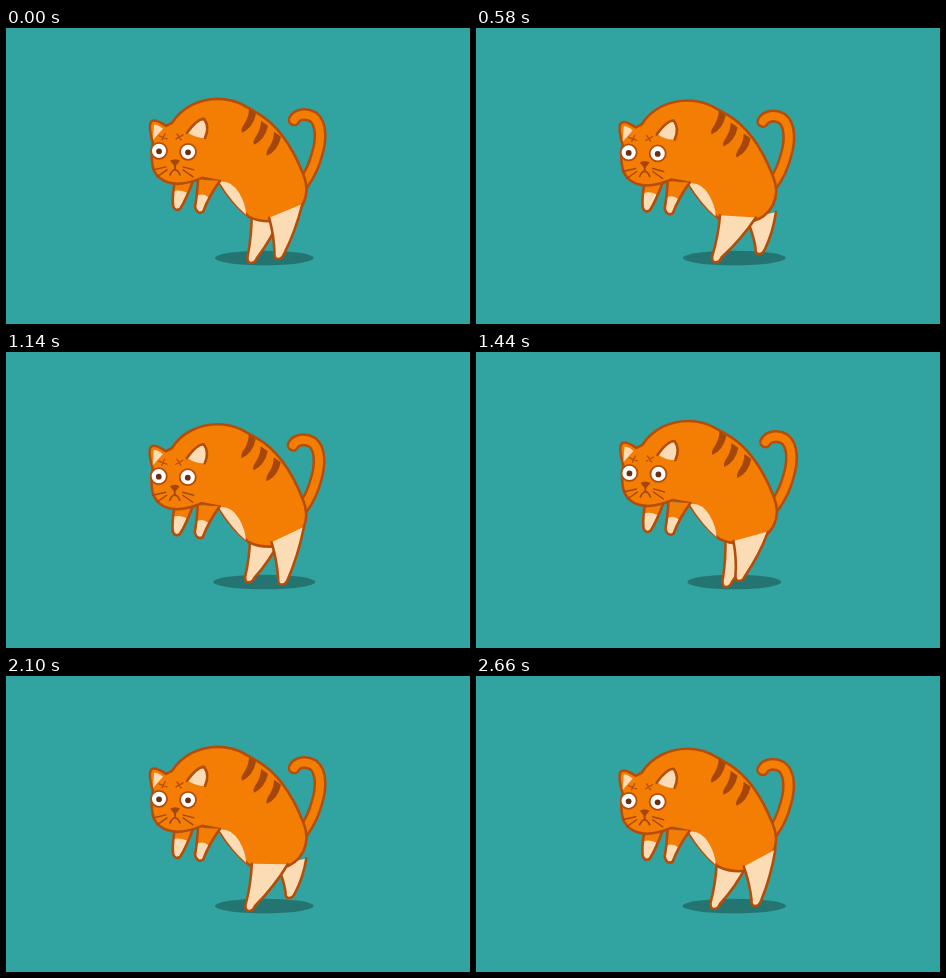
Write an HTML page with a canvas that moves like this. It is 464x296 px and loops after 2760 ms.

```html
<!DOCTYPE html>
<html lang="en">
<head>
<meta charset="utf-8">
<title>Walking cat</title>
<style>
  html, body { margin: 0; width: 100%; height: 100%; overflow: hidden; background: #31a3a1; }
  canvas { display: block; }
</style>
</head>
<body>
<canvas id="stage" width="464" height="296"></canvas>
<script>
const ctx = document.getElementById('stage').getContext('2d');
const ORANGE = '#f47d04', LINE = '#b54d0a', CREAM = '#fcdcb5', DARK = '#a5470d';
const LOOP = 2760, STEPS = 58, STRIDE = 30;

// Uneven cadence: every third pose is held.
const hold = i => (i < 30 ? i % 3 === 1 : i % 3 === 2 || i === 57) ? 100 : 20;

// Foot positions over one stride: [step, x, y]
const NEAR = [[0, 273, 230], [2, 264, 228], [7, 248, 229], [9, 241, 232], [12, 239, 233],
              [15, 244, 234], [19, 253, 236], [21, 265, 235], [24, 275, 233], [27, 280, 229], [30, 273, 230]];
const FAR = [[0, 284, 221], [4, 278, 215], [6, 259, 221], [9, 246, 228], [12, 239, 232],
             [15, 246, 234], [17, 251, 234], [22, 274, 231], [24, 278, 231], [27, 284, 227], [30, 284, 221]];

function footAt(keys, step) {
  const k = step % STRIDE;
  const i = keys.findIndex(key => key[0] > k);
  const [a, ax, ay] = keys[i - 1], [b, bx, by] = keys[i];
  const f = (k - a) / (b - a);
  return [ax + (bx - ax) * f, ay + (by - ay) * f];
}

function paint(d, fill, stroke, width = 2.6) {
  const path = new Path2D(d);
  if (fill) { ctx.fillStyle = fill; ctx.fill(path); }
  if (stroke) { ctx.strokeStyle = stroke; ctx.lineWidth = width; ctx.stroke(path); }
}

function oval(x, y, rx, ry, fill, stroke, width) {
  paint(`M${x - rx} ${y}a${rx} ${ry} 0 1 1 ${2 * rx} 0a${rx} ${ry} 0 1 1 ${-2 * rx} 0Z`, fill, stroke, width);
}

// A tapering hind leg from a tilted hip line down to a rounded toe.
function hindLeg([x, y], cx, cy, half, tilt) {
  const dx = half * Math.cos(tilt), dy = half * Math.sin(tilt);
  const lx = cx - dx, ly = cy - dy, rx = cx + dx, ry = cy + dy;
  paint(`M${lx} ${ly}Q${(lx + x) / 2} ${(ly + y) / 2 - 2} ${x - 4.5} ${y - 5}` +
        `Q${x - 5} ${y + 1} ${x - 1} ${y + 1}Q${x + 3} ${y + 1} ${x + 5} ${y - 4}` +
        `Q${(rx + x) / 2 + 5} ${(ry + y) / 2} ${rx} ${ry}`, CREAM, LINE);
}

function drawTail() {
  const d = 'M288 92C291 86 300 85 307 89C316 96 315 113 311 126Q307 142 297 156';
  paint(d, null, LINE, 13);
  paint(d, null, ORANGE, 8);
}

function drawBody() {
  // far front paw
  paint('M169 153Q166 167 167 178Q169 184 174 181Q180 172 187 153', ORANGE);
  paint('M167 164Q173 161 181 165L174 181Q169 184 167 178Z', CREAM);
  paint('M169 153Q166 167 167 178Q169 184 174 181Q180 172 187 153', null, LINE);

  // head, back and belly
  paint('M147 116Q142 98 145 94Q148 90 160 98L166 95C176 79 194 71 212 71C229 71 239 78 251 85' +
        'C274 98 288 123 297 146Q304 162 297 176Q290 189 276 192Q258 196 243 189Q226 176 212 153' +
        'L196 150Q185 155 172 156C157 156 147 148 146 134Q145 124 147 116Z', ORANGE, LINE);
  paint('M213 154Q225 152 233 165Q240 177 240 187Q226 175 213 154Z', CREAM);

  // near front paw
  const paw = 'M192 152Q191 168 189 179Q191 187 197 184Q203 168 214 153';
  paint(paw, ORANGE);
  paint('M190 169Q196 164 203 170L197 184Q191 187 189 179Z', CREAM);
  paint(paw, null, LINE);

  // back stripes
  for (const [x, y] of [[0, 0], [12, 12], [25, 23]]) {
    ctx.save();
    ctx.translate(x, y);
    paint('M243 81L250 86Q247 100 236 105Q234 102 239 95Q243 88 243 81Z', DARK);
    ctx.restore();
  }
}

function drawFace() {
  paint('M148 97L147 112L157 101Q151 96 148 97Z', CREAM);
  paint('M182 105Q192 90 198 91Q204 99 199 110Q191 111 182 105Z', CREAM);
  paint('M181 105Q191 91 198 91Q204 99 199 110', null, LINE);
  for (const [x, y] of [[153, 123], [182, 124]]) {
    oval(x, y, 8, 8, '#fff', LINE, 1.8);
    oval(x, y + .5, 2.9, 2.9, '#6b2e12');
  }
  paint('M153 108L161 111M156 112L159 106M170 111L177 107M171 106L175 112', null, LINE, 1.3);
  paint('M164 133Q169 130 174 133L169 139Z', DARK);
  paint('M169 138V142M164 147Q166 142 169 142Q172 142 174 147', null, DARK, 1.8);
  paint('M160 139L147 142M161 142L151 149M177 139L188 142M177 142L187 149', null, DARK, 1.4);
}

function draw(step) {
  const lift = Math.cos(2 * Math.PI * (step - 4.2) / 15) + .25;
  const dx = lift * .5, dy = -2.4 * lift;
  const near = footAt(NEAR, step), far = footAt(FAR, step + STRIDE / 2);

  ctx.fillStyle = '#31a3a1';
  ctx.fillRect(0, 0, 464, 296);
  oval(258.3, 230, 49.5 - 3 * lift, 7.3, '#247571');
  hindLeg(far, 256 + (far[0] - 239) * .66 + dx, 186 + dy, 15, -(far[0] - 255) * .008);

  ctx.save();
  ctx.translate(dx + lift * 1.3, dy);
  drawTail();
  ctx.restore();

  ctx.save();
  ctx.translate(dx, dy);
  drawBody();
  drawFace();
  ctx.restore();

  const hipX = 266 + (near[0] - 248) * .55;
  const hipY = 188 - Math.max(0, near[0] - 250) * .22 + dy * .3;
  oval(hipX - 1, hipY - 3, 13, 12, ORANGE);
  hindLeg(near, hipX, hipY, 18, -(near[0] - 245) * .014);
}

function frame(now) {
  let t = now % LOOP, step = 0;
  while (step < STEPS - 1 && t >= hold(step)) t -= hold(step++);
  draw(step);
  requestAnimationFrame(frame);
}

ctx.lineCap = ctx.lineJoin = 'round';
const start = performance.now();
draw(0);
requestAnimationFrame(function tick() { frame(Math.max(0, performance.now() - start)); });
</script>
</body>
</html>
```
